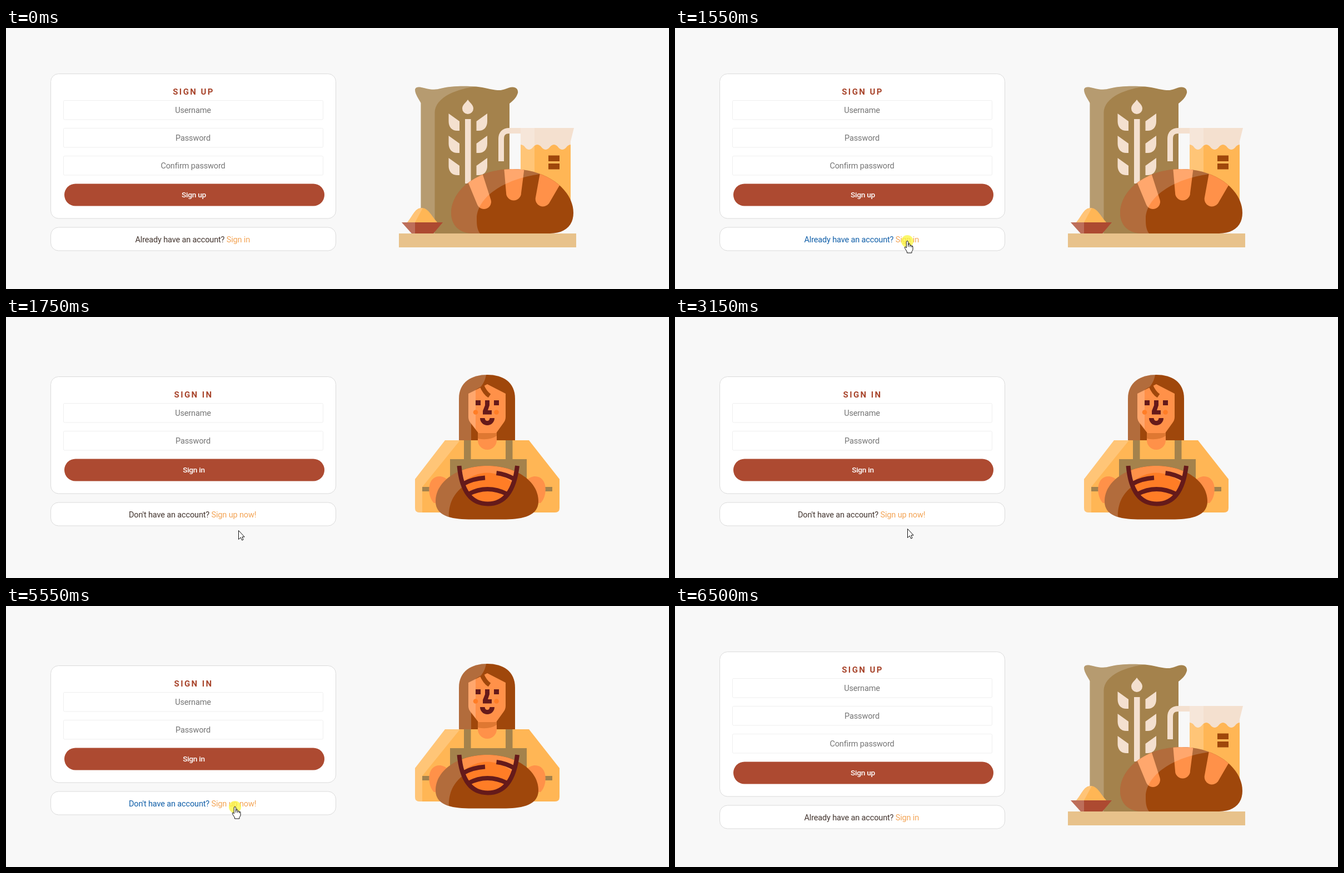
Write an HTML page that moves like this. It is 1193 px wide and 470 px high and loops after 7.16 s.

```html
<!DOCTYPE html>
<html lang="en">
<head>
<meta charset="utf-8">
<title>Sign up and sign in</title>
<style>
  html, body { margin: 0; width: 100%; height: 100%; overflow: hidden; background: #f8f8f8; }
  svg { display: block; width: 1193px; height: 470px; font: 14.5px Roboto, Inter, sans-serif; letter-spacing: -.15px; }
  .card { fill: #fff; stroke: #dbdbdb; }
  .field { fill: #fff; stroke: #efefef; }
  .hint { fill: #757575; text-anchor: middle; }
  .title { fill: #a8452c; font-size: 15px; font-weight: 700; letter-spacing: 2.4px; text-anchor: middle; }
  .button { fill: #ad4a31; }
  .label { fill: #fff; font-size: 13.7px; font-weight: 500; letter-spacing: -.3px; text-anchor: middle; }
  .ask { fill: #43352f; }
  .hover .ask { fill: #0f5ea8; }
  .ask .link, .hover .ask .link { fill: #f3a455; }
  .sack { fill: #a4824c; }
  .cream { fill: #f4e0cf; }
  .gold { fill: #ffb655; }
  .crust { fill: #9f470b; }
  .skin { fill: #ff9149; }
  .crumb { fill: #ff7d26; }
  .ink { fill: #651a1a; }
  .line { fill: none; stroke: #651a1a; stroke-width: 8; }
  .shine { fill: #fff; fill-opacity: .2; }
  .pointer { fill: #fff; stroke: #111; stroke-linejoin: round; }
</style>
</head>
<body>
<svg viewBox="0 0 1193 470">
  <defs>
    <path id="leaf" d="M796.5 154L816 168V185H812C803 185 796.5 179 796.5 168Z"/>
    <g id="leaves"><use href="#leaf"/><use href="#leaf" y="40"/><use href="#leaf" y="80"/></g>
    <path id="hand" d="M770 335C757 322 757 287 780 287C791 287 800 296 800 310V335Z"/>
    <clipPath id="loafShape"><path id="loaf" d="M840 370C816 370 801 355 801 333C801 292 848 254 911 254C974 254 1021 292 1021 333C1021 357 1004 370 979 370Z"/></clipPath>
    <clipPath id="breadShape"><path id="bread" d="M773 332C773 295 815 268 866 268C917 268 958 295 958 332C958 358 930 364 900 364.5H832C800 364 773 358 773 332Z"/></clipPath>
  </defs>

  <g id="signUp"></g>
  <g id="signIn"></g>

  <g id="pantry">
    <!-- flour sack -->
    <path class="sack" d="M746.5 370V135C743 128 736 119 736 111C737 105 745 106 752 108Q770 113 782 109C800 104 826 104 846 105.500C862 107 872 111 884 112C896 113 902 107 911 106.500C918 106 922 111 921 117C918 127 911 132 906 136V370Z"/>
    <path class="shine" d="M746.5 370V135C743 128 736 119 736 111C737 105 745 106 752 108Q770 113 782 109C800 104 826 104 846 105.500C815 109 771.500 123 771.500 153V370Z"/>
    <g class="cream">
      <path d="M826 164H836.5V280H826ZM831 129C834 134 841 138 841 145a10 10 0 0 1-20 0C821 138 828 134 831 129Z"/>
      <use href="#leaves"/>
      <use href="#leaves" transform="matrix(-1 0 0 1 1662.5 0)"/>
    </g>
    <!-- jug -->
    <path d="M891 240V200Q891 185 906 185H927" fill="none" stroke="#f4e0cf" stroke-width="10"/>
    <path class="cream" d="M926 180H1022L1016 204V230H926Z"/>
    <path class="gold" d="M926 210C934 210 934 219 941 219S949 210 956 210S964 219 971 219S979 210 986 210S994 219 1001 219S1009 210 1016 210V310H926Z"/>
    <path class="shine" d="M926 180H951V300H926Z"/>
    <path class="crust" d="M976 229.500H996V240H976ZM976 244H996V254.500H976Z"/>
    <!-- loaf -->
    <use href="#loaf" class="crust"/>
    <g clip-path="url(#loafShape)">
      <path class="skin" d="M829 272L855 255L872 308A13 13 0 0 1 848 318ZM896 250H933L927 297A13.500 13.500 0 0 1 900 297ZM963 250L1002 273L977 316A13.500 13.500 0 0 1 953 305Z"/>
      <path class="shine" d="M853 370C847 362 847 352 847 343C848 305 895 272 961 263L950 245H790V370Z"/>
    </g>
    <!-- bowl and table -->
    <path class="gold" d="M722 350C732 338 736 324 748 324S765 338 776 350Z"/>
    <path class="shine" d="M722 350C732 338 736 324 750 324L736 350Z"/>
    <path class="button" d="M712 350H786L769 370H730Z"/>
    <path class="shine" d="M712 350H736V370H730Z"/>
    <path fill="#e8c28b" d="M707 370H1026V395H707Z"/>
  </g>

  <g id="baker">
    <path class="crust" d="M815 222V147C815 117 838 104 866 104S916 117 916 147V222Z"/>
    <path class="gold" d="M790 222H941L996 292V344Q996 352 988 352H744Q736 352 736 344V292Z"/>
    <path class="shine" d="M790 222H817L749 306V352H744Q736 352 736 344V292Z"/>
    <path class="sack" d="M824 222H836.500V256H899V222H911.500V256H937V306H983V314H937V352H799V314H749V306H799V256H824Z"/>
    <!-- head -->
    <path class="skin" d="M849 200H883V222A17 17 0 0 1 849 222Z"/>
    <path fill="#df7832" d="M849 207H883V214Q869 223 849 219Z"/>
    <path class="skin" d="M832 138L866 121L899 138V180Q899 186 895 191L882 209H850L836 191Q832 186 832 180Z"/>
    <path d="M856 123Q861 136 870 142" fill="none" stroke="#9f470b" stroke-width="8"/>
    <path class="shine" d="M815 222V147C815 117 838 104 864 104Q862 116 855 125L845 131V202L837 191V222Z"/>
    <path class="ink" d="M845 150H854V159H845ZM878 150H887V159H878ZM862 150H870V159L867 168H874V175.500H858V169L862 159ZM853 182H861.500Q862 187 866 187T870.500 182H879A13 13 0 0 1 853 182Z"/>
    <circle class="crumb" cx="845" cy="171.500" r="4.300"/>
    <circle class="crumb" cx="882.500" cy="171.500" r="4.300"/>
    <!-- hands and bread -->
    <g class="skin"><use href="#hand"/><use href="#hand" transform="matrix(-1 0 0 1 1732 0)"/></g>
    <use href="#bread" class="crust"/>
    <g clip-path="url(#breadShape)">
      <path class="skin" d="M815 260H920C913 320 892 337 866 337S820 320 815 260Z"/>
      <path class="crumb" d="M820 299Q866 262 912 299C902 326 886 337 866 337S828 326 820 299Z"/>
      <path class="shine" d="M797 364C795 336 807 315 826 303L817 260H760V370Z"/>
    </g>
    <path class="line" d="M815.500 268C820 318 840 336.500 867 336.500S914 318 920 268M824 300Q840 291 862 289.500M882.500 281Q899 283 915 292M832 319Q866 301 902 319"/>
  </g>

  <circle id="click" r="11" fill="#faf53c" fill-opacity=".75"/>
  <g id="cursor" class="pointer">
    <path id="arrow" d="M.5.5V16.500L4.200 13L6.600 18L9 17L6.800 12H11.200Z"/>
    <g id="finger">
      <path d="M-1.700 1.500Q-1.500-.5 0-.5T1.700 1.500V7Q4-.5 5 8Q7 5.500 8 9Q10 7 10 10.500V15Q9.500 17 8 18.500V21H-.5V19L-4.500 12.500Q-5.500 10-3.500 10L-1.700 12Z"/>
      <path fill="none" d="M1.700 6V10M4.900 7.500V10.500M8 8.500V11"/>
    </g>
  </g>
</svg>
<script>
const LOOP = 7160, STEP = 68;
const $ = id => document.getElementById(id);
const show = (id, on) => $(id).style.display = on ? '' : 'none';
const box = (kind, x, y, w, h, r) =>
  `<rect class="${kind}" x="${x}" y="${y}" width="${w}" height="${h}" rx="${r}"/>`;
const text = (kind, x, y, content) => `<text class="${kind}" x="${x}" y="${y}">${content}</text>`;

function form(top, title, fields, button, askX, question, link) {
  const end = top + 48 + 50 * fields.length;
  return box('card', 80.5, top + .5, 513, end - top + 62.5, 14)
    + text('title', 337.5, top + 38, title)
    + fields.map((name, i) => {
      const y = top + 48 + 50 * i;
      return box('field', 103.5, y + .5, 467, 34.5, 2) + text('hint', 336.5, y + 23, name);
    }).join('')
    + box('button', 105, end + .5, 468, 40, 20)
    + text('label', 338, end + 25, button)
    + box('card', 80.5, end + 79, 513, 42, 14)
    + text('ask', askX, end + 105.5, `${question} <tspan class="link">${link}</tspan>`);
}

$('signUp').innerHTML = form(82, 'SIGN UP', ['Username', 'Password', 'Confirm password'],
  'Sign up', 232.5, 'Already have an account?', 'Sign in');
$('signIn').innerHTML = form(107, 'SIGN IN', ['Username', 'Password'],
  'Sign in', 221, "Don't have an account?", 'Sign up now!');

// Cursor track: time, x, y
const track = [
  [590, 482, 462], [880, 440, 402], [1200, 418, 384],
  [3080, 418, 384], [3150, 418, 381], [3690, 412, 361.5],
  [6080, 412, 361.5], [6150, 416, 371], [6220, 425, 384],
  [6290, 480, 388], [6360, 577, 391], [6430, 920, 445]
];

// The pointer moves in discrete steps, counted from the start of each gesture.
function cursorAt(t) {
  const start = [6150, 3150, 590].find(s => t >= s) ?? 590;
  const time = start + Math.floor((t - start) / STEP) * STEP;
  const i = track.findIndex(key => key[0] > time);
  if (i < 0) return track.at(-1).slice(1);
  const [t0, x0, y0] = track[Math.max(0, i - 1)], [t1, x1, y1] = track[i];
  const k = t1 > t0 ? Math.max(0, (time - t0) / (t1 - t0)) : 0;
  return [x0 + (x1 - x0) * k, y0 + (y1 - y0) * k];
}

function draw(now) {
  const t = now % LOOP;
  const within = (from, to) => t >= from && t < to;
  const signingIn = within(1680, 5620);
  const visible = within(590, 6500);
  const [x, y] = cursorAt(t);
  const [left, right, top] = signingIn ? [221, 452, 345] : [233, 440, 370];
  const hover = visible && x >= left && x <= right && y >= top && y <= top + 21;

  show('signUp', !signingIn);
  show('pantry', !signingIn);
  show('signIn', signingIn);
  show('baker', within(1750, 5620));
  $('signUp').setAttribute('class', hover ? 'hover' : '');
  $('signIn').setAttribute('class', hover ? 'hover' : '');

  show('cursor', visible);
  show('arrow', !hover);
  show('finger', hover);
  show('click', within(1550, 1680) || within(5550, 5620));
  for (const id of ['cursor', 'click'])
    $(id).setAttribute('transform', `translate(${Math.round(x)} ${Math.round(y)})`);
}

const begin = performance.now();
function tick() {
  draw(performance.now() - begin);
  requestAnimationFrame(tick);
}
tick();
</script>
</body>
</html>
```
